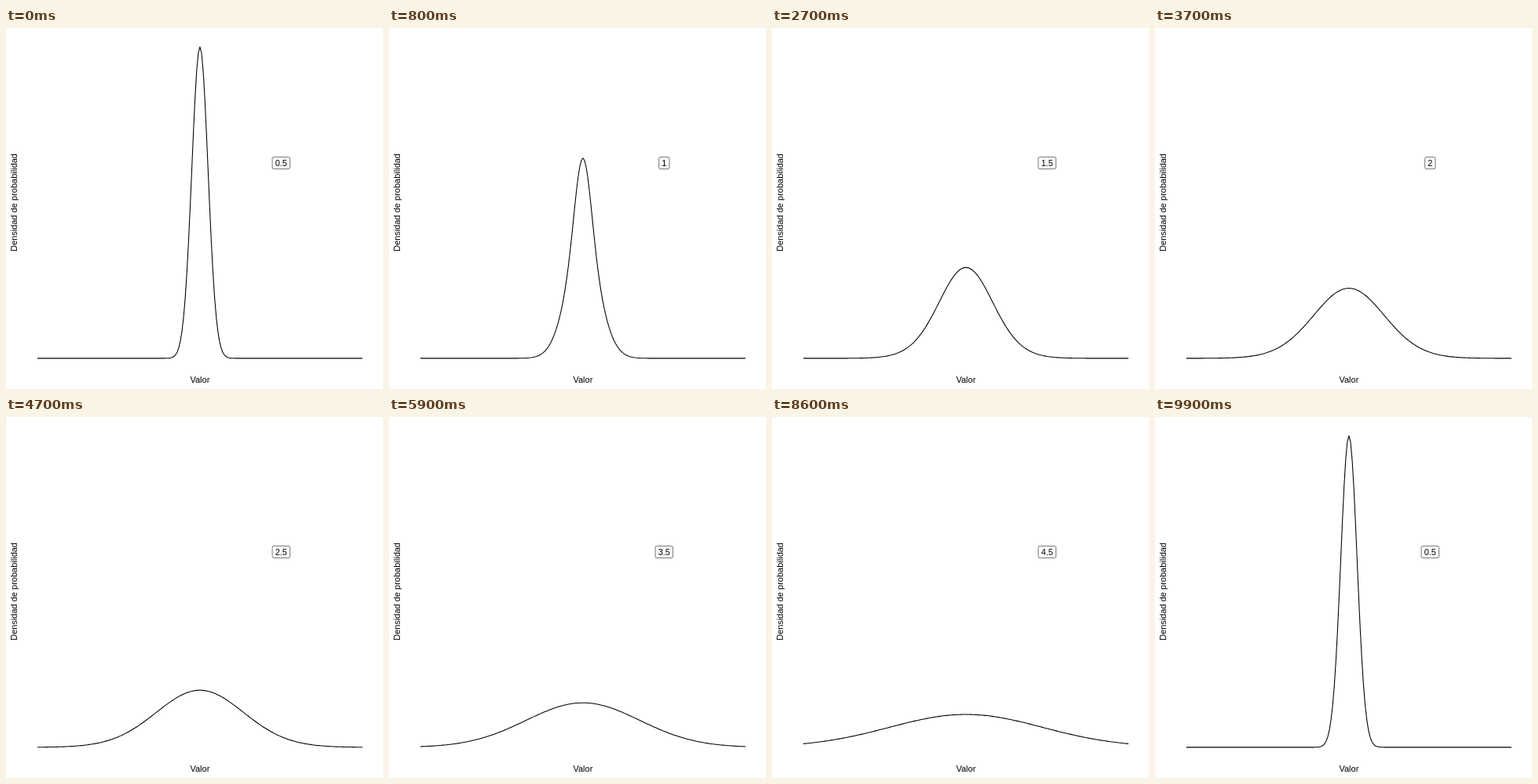
An HTML page that plays this animation: 480 px wide and 460 px high, repeating every 10 s.

```html
<!DOCTYPE html>
<html lang="es">
<head>
<meta charset="utf-8">
<style>
  html, body { margin: 0; width: 100%; height: 100%; overflow: hidden; background: #fff; }
  svg { display: block; width: 480px; height: 460px; }
  text { font: 11px "Liberation Sans", Arial, Helvetica, sans-serif; text-anchor: middle; }
</style>
</head>
<body>
<svg viewBox="0 0 480 460">
  <path id="curve" fill="none" stroke="#000" stroke-width="1.07" stroke-linejoin="round"/>
  <rect id="box" y="164.4" height="15.2" rx="2.16" fill="#fff" stroke="#000" stroke-width="0.55"/>
  <text id="label" x="350.3" y="176"></text>
  <text x="246.9" y="451.6">Valor</text>
  <text transform="translate(13.5 222.4) rotate(-90)">Densidad de probabilidad</text>
</svg>
<script>
  const LOOP = 10000, TICK = 100, STATES = 10;
  const CENTER = 246.9, UNIT = 20.69, BASE = 420.9, PEAK = 396.8;
  const curve = document.getElementById('curve');
  const box = document.getElementById('box');
  const label = document.getElementById('label');

  const sigmaOf = state => (state % STATES + 1) / 2;
  // Normal density, scaled so that sigma 0.5 peaks at 1.
  const density = (x, sigma) => 0.5 / sigma * Math.exp(-x * x / (2 * sigma * sigma));

  // Each state eases linearly into the next, then rests; times in ticks.
  function poseAt(tick) {
    for (let state = 0; state < STATES; state++) {
      const end = (state + 1) * 10 - (state < 5 ? 0 : 1);
      const length = state === 0 ? 7 : 6;
      if (tick <= end) return { state, mix: Math.max(0, 1 - (end - tick) / length) };
    }
    return { state: 0, mix: 0 };
  }

  function draw(time) {
    const { state, mix } = poseAt(Math.floor(time % LOOP / TICK));
    const from = sigmaOf(state), to = sigmaOf(state + 1);
    const points = [];
    for (let i = -100; i <= 100; i++) {
      const x = i / 10;
      const height = density(x, from) * (1 - mix) + density(x, to) * mix;
      points.push((CENTER + x * UNIT).toFixed(2) + ' ' + (BASE - height * PEAK).toFixed(2));
    }
    curve.setAttribute('d', 'M' + points.join('L'));

    const value = mix > 0.5 + 1e-6 ? to : from;
    const width = Number.isInteger(value) ? 13.3 : 22.5;
    label.textContent = value;
    box.setAttribute('x', 350.3 - width / 2);
    box.setAttribute('width', width);
  }

  const start = performance.now();
  function frame() {
    draw(performance.now() - start);
    requestAnimationFrame(frame);
  }
  frame();
</script>
</body>
</html>
```
